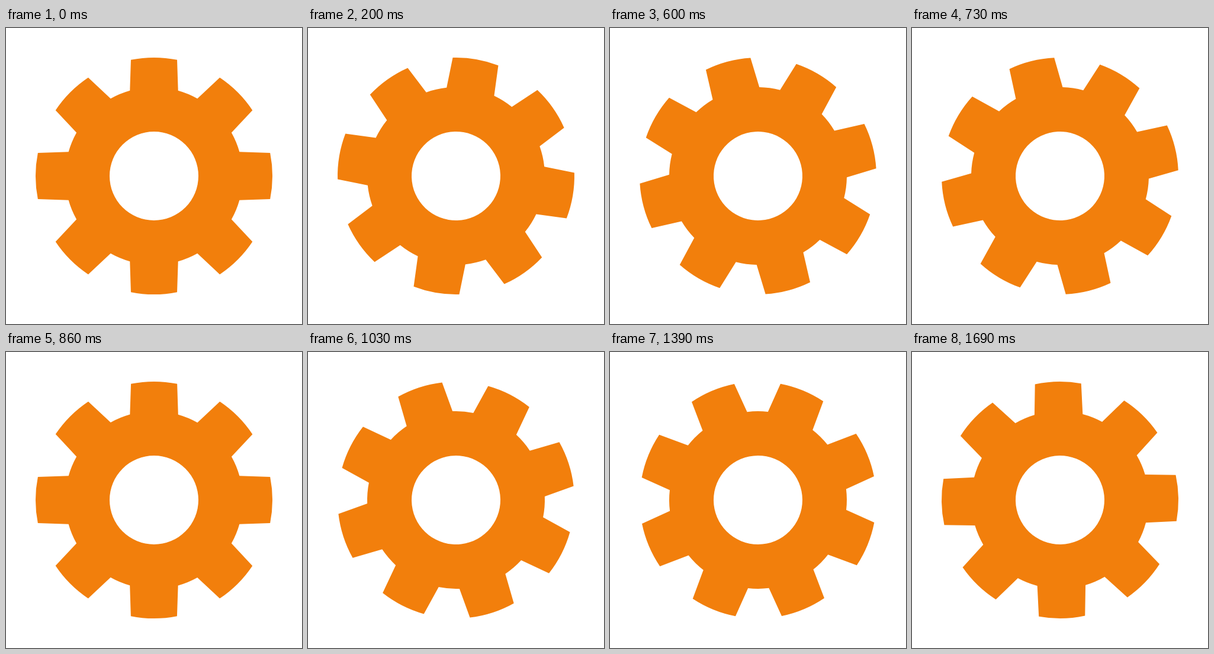
Recreate the animation shown at these times as an HTML page. Size 500 by 500 pixels, loop 1.72 s.

```html
<!DOCTYPE html>
<html lang="en">
<head>
<meta charset="utf-8">
<title>Turning gear</title>
<style>
  html, body { margin: 0; width: 100%; height: 100%; overflow: hidden; background: #fff; }
  svg { display: block; width: 100%; height: 100%; }
</style>
</head>
<body>
<svg viewBox="0 0 500 500">
  <g id="gear" transform="translate(250 250)">
    <path id="shape" fill="#f27f0c" fill-rule="evenodd"/>
  </g>
</svg>
<script>
const LOOP = 1720, STEPS = 52;
const TEETH = 8, TIP = 200, ROOT = 150, HOLE = 75;
const TIP_HALF = 11.25, ROOT_HALF = 15.75;

const gear = document.getElementById('gear');

// Angles run clockwise from the top, in degrees.
function polar(radius, angle) {
  const a = angle * Math.PI / 180;
  return `${(radius * Math.sin(a)).toFixed(3)} ${(-radius * Math.cos(a)).toFixed(3)}`;
}
const line = (r, angle) => `L${polar(r, angle)}`;
const arc = (r, angle) => `A${r} ${r} 0 0 1 ${polar(r, angle)}`;

function gearPath() {
  const pitch = 360 / TEETH;
  let d = `M${polar(ROOT, -ROOT_HALF)}`;
  for (let i = 0; i < TEETH; i++) {
    const mid = i * pitch;
    d += line(TIP, mid - TIP_HALF) + arc(TIP, mid + TIP_HALF)
       + line(ROOT, mid + ROOT_HALF) + arc(ROOT, mid + pitch - ROOT_HALF);
  }
  return `${d}ZM${polar(HOLE, 0)}${arc(HOLE, 180)}${arc(HOLE, 360)}Z`;
}

function bezier(x1, y1, x2, y2) {
  const at = (a, b, u) => 3 * a * u * (1 - u) ** 2 + 3 * b * u * u * (1 - u) + u ** 3;
  return x => {
    let lo = 0, hi = 1;
    for (let i = 0; i < 40; i++) {
      const mid = (lo + hi) / 2;
      if (at(x1, x2, mid) < x) lo = mid; else hi = mid;
    }
    return at(y1, y2, (lo + hi) / 2);
  };
}
const ease = bezier(0.5856, 0.0703, 0.4143, 0.9297);

// Steps last 30 or 40 ms, in groups of 16 that take 530 ms after the first step.
function stepAt(ms) {
  const ticks = Math.floor(ms / 10) - 3;
  if (ticks < 0) return 0;
  const inGroup = Math.min(15, Math.floor((ticks % 53) * 3 / 10));
  return 1 + 16 * Math.floor(ticks / 53) + inGroup;
}

function render(ms) {
  const step = stepAt(ms % LOOP);
  const angle = step ? 360 * ease(step / STEPS) : 0;
  gear.setAttribute('transform', `translate(250 250) rotate(${angle.toFixed(3)})`);
}

document.getElementById('shape').setAttribute('d', gearPath());
const start = performance.now();
function tick() {
  render(performance.now() - start);
  requestAnimationFrame(tick);
}
tick();
</script>
</body>
</html>
```
